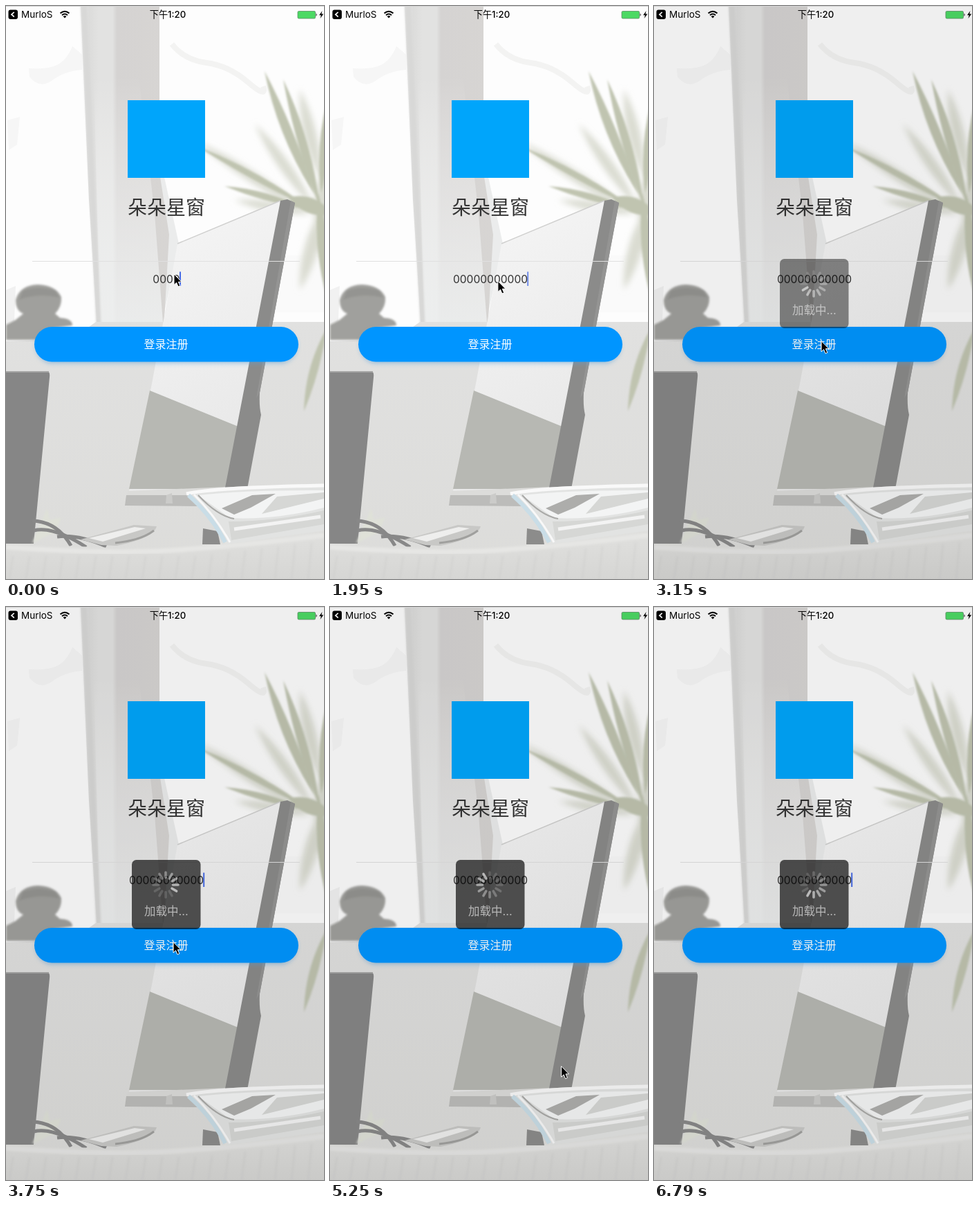
An HTML page that plays this animation: 460 px wide and 827 px high, repeating every 6.89 s.

```html
<!DOCTYPE html>
<html lang="zh">
<head>
<meta charset="utf-8">
<title>登录</title>
<style>
  html, body { margin: 0; width: 100%; height: 100%; overflow: hidden; background: #fdfdfd; }
  svg { display: block; width: 100vw; height: 100vh; }
  text { font-family: Inter, "Noto Sans CJK SC", "Noto Sans CJK", sans-serif; }
  .mid { text-anchor: middle; }
</style>
</head>
<body>
<svg viewBox="0 0 460 827" preserveAspectRatio="none">
  <defs>
    <linearGradient id="frame">
      <stop offset="0" stop-color="#e6e6e6"/>
      <stop offset=".1" stop-color="#dcdcdb"/>
      <stop offset=".2" stop-color="#e2e2e1"/>
      <stop offset=".36" stop-color="#e2e2e1"/>
      <stop offset=".41" stop-color="#d5d3d2"/>
      <stop offset="1" stop-color="#d7d5d3"/>
    </linearGradient>
    <linearGradient id="fade" x2="0" y2="1">
      <stop offset="0" stop-color="#fdfdfd" stop-opacity="0"/>
      <stop offset="1" stop-color="#eef0f0" stop-opacity=".85"/>
    </linearGradient>
    <linearGradient id="wall" x2="0" y2="1">
      <stop offset="0" stop-color="#e1e1e0"/>
      <stop offset="1" stop-color="#dcdcda"/>
    </linearGradient>
    <linearGradient id="screen" x2=".3" y2="1">
      <stop offset="0" stop-color="#f6f6f6"/>
      <stop offset="1" stop-color="#e8e8e8"/>
    </linearGradient>
    <linearGradient id="desk" x2="0" y2="1">
      <stop offset="0" stop-color="#e1e1df"/>
      <stop offset="1" stop-color="#d6d6d4"/>
    </linearGradient>
    <filter id="soft" x="-5%" y="-5%" width="110%" height="110%"><feGaussianBlur stdDeviation=".7"/></filter>
    <filter id="blur" x="-10%" y="-10%" width="120%" height="120%"><feGaussianBlur stdDeviation="1.6"/></filter>
    <filter id="haze" x="-20%" y="-20%" width="140%" height="140%"><feGaussianBlur stdDeviation="4"/></filter>
    <filter id="glow" x="-10%" y="-30%" width="120%" height="180%"><feGaussianBlur stdDeviation="3"/></filter>
  </defs>

  <rect width="460" height="827" fill="#fdfdfd"/>
  <g filter="url(#soft)">
    <!-- window -->
    <path d="M33 90Q60 92 74 85T96 58L110 70V92Q84 94 66 108Q48 120 34 102ZM2 165L20 160 16 200 4 208Z" fill="#f6f6f6"/>
    <path d="M240 55Q258 78 290 82T350 110 372 116" fill="none" stroke="#f3f3f2" stroke-width="8"/>
    <path d="M222 215L250 343 236 410 225 460H205Z" fill="#ebecec"/>
    <path d="M108 0H222V240L236 330 228 470H132L120 280Z" fill="url(#frame)"/>
    <path d="M127 100H192L215 300 228 470H136Z" fill="url(#fade)"/>
    <path d="M108 0H117L138 470H131Z" fill="#d8d8d7" filter="url(#blur)"/>
    <path d="M0 484L95 481 130 456H460V827H0Z" fill="url(#wall)"/>
    <path d="M372 360H460V442H366Z" fill="#fafafa"/>
    <path d="M0 410L14 404 12 455 0 460Z" fill="#f1f1f1"/>
    <!-- figurine -->
    <g filter="url(#blur)">
      <path d="M0 482V460L14 453 25 444Q14 440 14 424Q20 403 46 402Q72 403 80 420Q81 434 71 444L78 450Q96 451 96 461L62 466 60 482Z" fill="#a0a09d"/>
      <path d="M24 411Q46 402 72 411L77 421Q48 414 19 424Z" fill="#949491"/>
    </g>
    <g id="far" fill="#dadcd1" filter="url(#haze)"></g>
    <g id="near" fill="#c0c4b0" filter="url(#blur)"></g>
    <!-- monitor -->
    <path d="M397 281L248 343 236 410 211 545 178 700H322L360 540Z" fill="url(#screen)"/>
    <path d="M248 343L397 281" stroke="#d0d0cf" stroke-width="1.6"/>
    <path d="M208 555L336 607 320 697H178Z" fill="#b7b8b3"/>
    <path d="M176 700L320 694 348 697 343 716 172 716Z" fill="#dcdcda"/>
    <path d="M174 706H268L278 722 172 721Z" fill="#bcbcba"/>
    <path d="M232 706L240 703 241 718H231Z" fill="#cbcbc9"/>
    <path d="M397 281L407 279 418 284 367 558Q366 578 369 590L349 697 317 695Z" fill="#8b8b8a"/>
    <path d="M412 281L418 284 367 558 362 566Z" fill="#949493"/>
    <!-- black case and cables -->
    <path d="M0 528L60 527Q64 528 63 536L40 776H0Z" fill="#868686"/>
    <path d="M0 528L62 528" stroke="#a5a5a4" stroke-width="2"/>
    <path d="M38 775L52 742 60 725 63 742 80 738 70 760Z" fill="#dfe1d8" filter="url(#blur)"/>
    <g fill="none" stroke="#888" stroke-width="5">
      <path d="M38 743Q74 744 94 779"/>
      <path d="M40 757Q68 750 116 781"/>
      <path d="M74 766Q104 762 145 780"/>
    </g>
    <path d="M108 770L185 749 218 751Q214 768 160 779L138 778Z" fill="#c8c8c6"/>
    <path d="M120 768L186 752 202 754 140 773Z" fill="#eeeeed"/>
    <path d="M158 775Q196 771 214 757" fill="none" stroke="#a0a09e" stroke-width="3"/>
    <!-- table -->
    <path d="M0 776L130 781Q220 786 300 775L460 752V827H0Z" fill="url(#desk)"/>
    <path d="M0 781Q150 792 250 785T460 764" fill="none" stroke="#e6e6e4" stroke-width="7" filter="url(#blur)"/>
    <g id="weave" stroke="#cbcbc9" stroke-width="2" opacity=".5" filter="url(#blur)"></g>
    <!-- glass bowl -->
    <path d="M285 754L306 758 310 777H284Z" fill="#8c8c8b"/>
    <path d="M260 704Q276 696 350 693L460 689V757L318 777Q298 734 260 704Z" fill="#e2e3e2"/>
    <path d="M278 706Q350 698 460 699V724Q390 742 324 739Z" fill="#f3f4f4"/>
    <path d="M312 725L356 706 390 704 354 724 330 734Z" fill="#adadab"/>
    <path d="M392 708L460 702V711L370 733Z" fill="#d6d7d5"/>
    <path d="M322 744Q390 744 460 728V748L326 771Z" fill="#d6d7d5"/>
    <path d="M330 755L455 737" stroke="#f3f3f3" stroke-width="5"/>
    <path d="M261 704Q300 695 460 692" fill="none" stroke="#f9f9f9" stroke-width="5"/>
    <path d="M264 706Q298 736 317 774" fill="none" stroke="#c9dde7" stroke-width="6"/>
    <path d="M272 705Q302 735 324 774" fill="none" stroke="#f8f8f8" stroke-width="3"/>
    <path d="M278 706Q306 736 330 740" fill="none" stroke="#a9a9a7" stroke-width="2"/>
  </g>

  <!-- status bar -->
  <rect x="3.5" y="5.5" width="13.5" height="13.5" rx="3"/>
  <path d="M11.8 8.8L8 12.2 11.8 15.6" fill="none" stroke="#fff" stroke-width="1.7"/>
  <text x="22" y="17" font-size="13.5">MurloS</text>
  <path d="M78.5 10.6Q85 4.8 91.5 10.6M81 13.3Q85 9.8 89 13.3" fill="none" stroke="#000" stroke-width="2"/>
  <path d="M82.6 15Q85 13.2 87.4 15L85 17.6Z"/>
  <text class="mid" x="234" y="17.3" font-size="13.2" font-weight="500">下午1:20</text>
  <rect x="422" y="7.5" width="25.5" height="10.5" rx="1.5" fill="#4cd964" stroke="#5c8f66" stroke-width=".8"/>
  <path d="M448.5 10.5Q451 12.7 448.5 15Z" fill="#333"/>
  <path d="M457.5 7L453 13.3H455.8L454.5 18 459.2 11.6H456.3Z"/>

  <!-- form -->
  <rect x="176" y="136" width="112" height="112" fill="#00a5fb"/>
  <text class="mid" x="232" y="301" font-size="28" fill="#333">朵朵星窗</text>
  <path d="M38 368.5H425" stroke="#e0e0e0"/>
  <text id="digits" class="mid" x="232" y="399.5" font-size="15.6" fill="#333"></text>
  <rect id="caret" y="383.5" width="2" height="20.5" fill="#466be6"/>
  <rect x="43" y="467" width="378" height="49" rx="24.5" fill="#5b9fd6" opacity=".5" filter="url(#glow)"/>
  <rect x="41" y="463" width="382" height="50.5" rx="25.25" fill="#0095ff"/>
  <text id="label" class="mid" x="231.5" y="494" font-size="16" font-weight="300" fill="#fff">登录注册</text>

  <!-- loading panel -->
  <rect id="dim" width="460" height="827" opacity=".055"/>
  <g id="hud">
    <rect x="182" y="365" width="99.5" height="100" rx="6.5" opacity=".66"/>
    <g id="spinner" stroke="#fff" stroke-width="3.6" stroke-linecap="round"></g>
    <text class="mid" x="232" y="444.5" font-size="16.5" fill="#b9b9b9">加载中...</text>
  </g>
  <rect width="460" height="1" fill="#d4d4d4"/>
  <path id="pointer" d="M0 0V15.5L3.6 12.2 6 18 8.8 16.8 6.4 11.2H11Z" stroke="#fff"/>
</svg>
<script>
const LOOP = 6890, TICK = 150, LAST = 6790;
const $ = id => document.getElementById(id);
const clamp = v => Math.max(0, Math.min(1, v));
const mix = (a, b, p) => a + (b - a) * p;
const smooth = p => { p = clamp(p); return p * p * (3 - 2 * p); };
const mod = (a, n) => ((a % n) + n) % n;

function add(parent, tag, attrs) {
  const el = document.createElementNS("http://www.w3.org/2000/svg", tag);
  for (const key in attrs) el.setAttribute(key, attrs[key]);
  return parent.appendChild(el);
}

// A tapered blade from root to tip, bent sideways.
function leaf(parent, x, y, tx, ty, width, bend = 0) {
  const len = Math.hypot(tx - x, ty - y);
  const nx = -(ty - y) / len, ny = (tx - x) / len;
  const side = k => `${(x + tx) / 2 + nx * k} ${(y + ty) / 2 + ny * k}`;
  add(parent, "path", { d: `M${x} ${y}Q${side(bend + width)} ${tx} ${ty}Q${side(bend - width)} ${x} ${y}Z` });
}

[[445, 290, 360, 170, 16], [440, 300, 275, 195, 16], [455, 250, 425, 120, 18], [440, 300, 330, 280, 14],
 [458, 290, 425, 410, 20], [462, 220, 455, 360, 26]]
  .forEach(l => leaf($("far"), ...l));
[[446, 272, 374, 94, 14, -4], [454, 290, 401, 106, 13, 3], [456, 270, 464, 140, 13], [440, 292, 276, 202, 9, 3],
 [436, 294, 316, 260, 10, 3], [452, 270, 470, 440, 16, 3], [464, 465, 431, 585, 12, 4], [408, 276, 472, 300, 22]]
  .forEach(l => leaf($("near"), ...l));

for (let x = 10; x < 460; x += 24) {
  add($("weave"), "path", { d: `M${x} ${794 - Math.max(0, x - 280) * .12}L${x - 5} 827` });
}

const spokes = Array.from({ length: 12 }, (_, i) =>
  add($("spinner"), "path", { d: "M0-10.5V-18", transform: `translate(231 401) rotate(${i * 30})` }));

const keyTimes = [150, 300, 600, 750, 900, 1200, 1350];

function caretAlpha(t) {
  if (t < 1800) return 1;
  const p = mod(t - 3150, 1000) / 1000;
  return p < .5 ? clamp((p - .2) / .2) : clamp((.95 - p) / .2);
}

function pointerAt(t) {
  if (t < 4950) {
    const p = smooth((t - 1800) / 750);
    return [mix(243, 242, p), mix(387, 483.5, p)];
  }
  const p = smooth((t - 4900) / 650);
  return [mix(242, 408, p), mix(483.5, 805, p)];
}

function draw(time) {
  const t = time >= LAST ? LAST : Math.min(6600, Math.floor(time / TICK) * TICK);
  const count = 4 + keyTimes.filter(k => t >= k).length;
  $("digits").textContent = "0".repeat(count);
  $("caret").setAttribute("x", 231.5 + count * 4.88);
  $("caret").setAttribute("opacity", caretAlpha(t));
  $("label").setAttribute("opacity", t === 3000 ? .65 : 1);

  const loading = t >= 3150;
  $("dim").setAttribute("visibility", loading ? "visible" : "hidden");
  $("hud").setAttribute("opacity", loading ? (t < 3300 ? .68 : 1) : 0);
  const head = Math.round((100 + (t - 4650) * .385) / 30);
  spokes.forEach((s, i) => s.setAttribute("opacity", Math.max(.14, .62 - .06 * mod(head - i, 12))));

  const [x, y] = pointerAt(t);
  $("pointer").setAttribute("transform", `translate(${x} ${y})`);
  $("pointer").setAttribute("visibility", t < 6000 ? "visible" : "hidden");
}

function frame() {
  draw(performance.now() % LOOP);
  requestAnimationFrame(frame);
}
frame();
</script>
</body>
</html>
```
